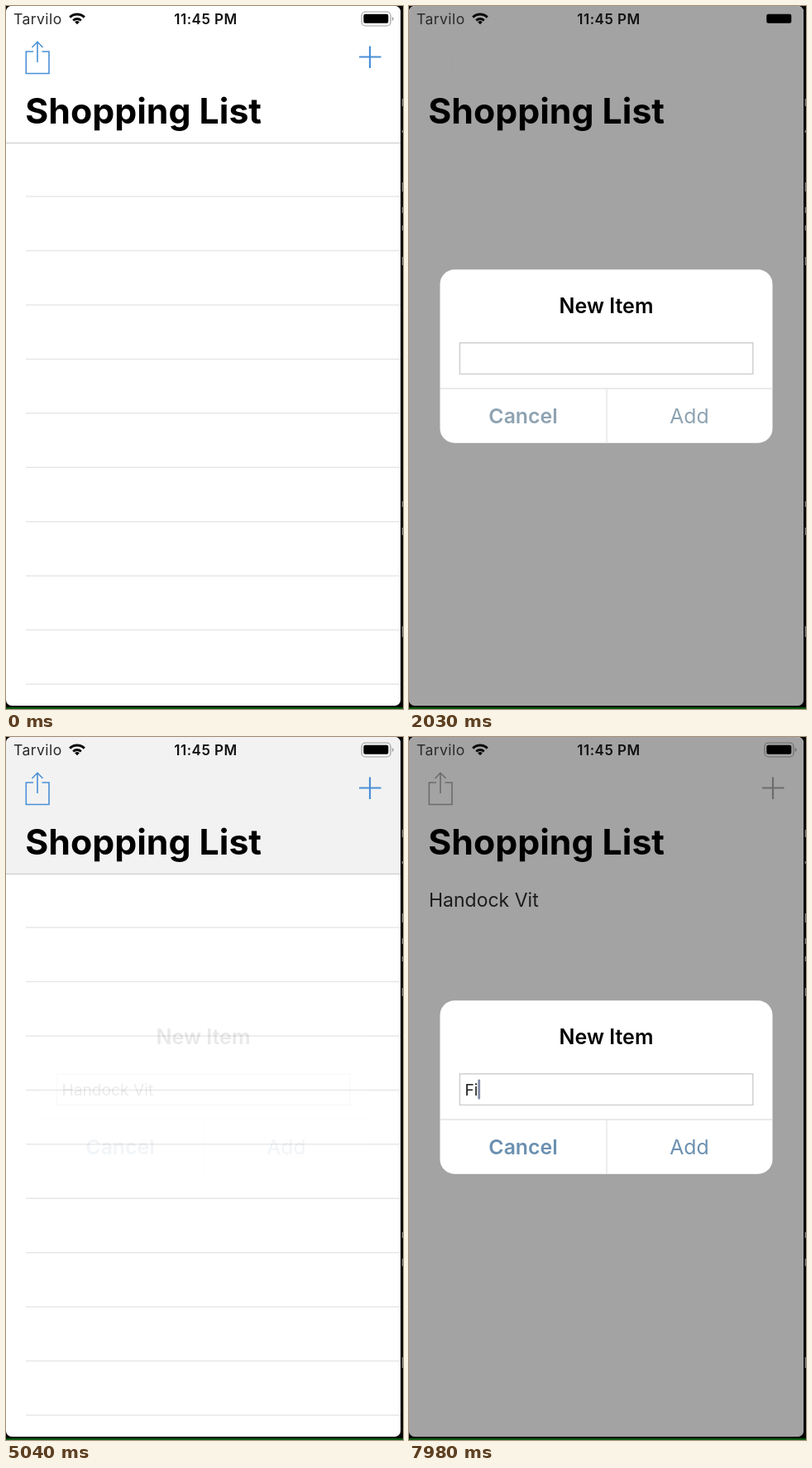
Recreate the animation shown at these times as an HTML page. Size 480x849 px, loop 8000 ms.

```html
<!DOCTYPE html>
<html lang="en">
<head>
<meta charset="utf-8">
<title>Shopping List</title>
<style>
html, body { margin: 0; width: 100%; height: 100%; overflow: hidden; background: #000; }
svg { display: block; width: 100%; height: 100%; }
text { font-family: Inter, Roboto, "Liberation Sans", sans-serif; white-space: pre; }
.mid { text-anchor: middle; }
.semi { font-weight: 600; }
.line { fill: none; stroke: currentColor; }
</style>
</head>
<body>
<svg viewBox="0 0 480 849">
  <defs><clipPath id="screen"><rect width="477" height="845" rx="7"/></clipPath></defs>
  <rect width="480" height="849" fill="#060606"/>
  <rect y="847" width="480" height="2" fill="#0b5a10"/>
  <g id="specks" fill="#777"></g>

  <g clip-path="url(#screen)">
    <rect width="478" height="845" fill="#fff"/>
    <rect id="header" width="478" height="165"/>
    <rect id="dim" width="478" height="845" fill="#000"/>
    <g id="rules">
      <path d="M0 165.5H478" stroke="#000" stroke-opacity=".17" stroke-width="1.5"/>
      <g id="rows" stroke="#000" stroke-opacity=".095" stroke-width="1.5"></g>
    </g>

    <text x="9" y="21.5" font-size="17.6" letter-spacing=".4" fill="#2a2a2a">Tarvilo</text>
    <g fill="none" stroke="#0a0a0a" stroke-width="3">
      <path d="M77.2 13.6a12.6 12.6 0 0 1 17.6 0"/>
      <path d="M81.2 17.4a7 7 0 0 1 9.6 0" stroke-width="2.8"/>
      <path d="M86 22.2l-2.8-2.8a4 4 0 0 1 5.6 0z" fill="#0a0a0a" stroke="none"/>
    </g>
    <text class="mid semi" x="241.5" y="21.5" font-size="17" letter-spacing=".5" fill="#111">11:45 PM</text>
    <g id="battery">
      <rect class="line" x="430" y="7" width="35" height="17" rx="4.5" stroke-width="1.2"/>
      <path d="M466.8 13v5a2.6 2.6 0 0 0 0-5z" fill="currentColor"/>
    </g>
    <rect x="432.3" y="9.8" width="30" height="11" rx="2" fill="#000"/>

    <g id="share" class="line" stroke-width="1.6">
      <path d="M33 55H24.3V81.5H52V55H43.5M38 68V44M31.5 50L38 43.3L44.5 50"/>
    </g>
    <path id="plus" class="line" d="M427 61.5H453.5M440 48.5V75" stroke-width="2.2"/>

    <text x="23.3" y="141.5" font-size="42.8" font-weight="700">Shopping List</text>
    <text id="item" x="24" y="205.3" font-size="23" fill="#1c1c1c"></text>

    <g id="alert">
      <rect x="37.5" y="318.3" width="402" height="209.4" rx="17.5" fill="#fff"/>
      <path d="M38 462H439.5M239 462V527.5" stroke="#e4e4e6" stroke-width="1.3"/>
      <rect x="61.4" y="406.8" width="354.4" height="37.6" fill="#fff" stroke="#d0d0d2" stroke-width="1.5"/>
      <text id="title" class="mid semi" x="238.5" y="371.4" font-size="25">New Item</text>
      <text id="entry" x="67.5" y="432.6" font-size="19.2" fill="#222"></text>
      <rect id="caret" y="413.5" width="2.8" height="24" rx="1" fill="#858aa6"/>
      <g id="buttons" fill="currentColor" font-size="24.8">
        <text class="mid semi" x="138" y="504.4">Cancel</text>
        <text class="mid" x="339" y="504.4">Add</text>
      </g>
    </g>
  </g>
</svg>
<script>
const LOOP = 8000, OPEN_MS = 250, DIM = 0.36;
const ITEM = 'Handock Vit';
const BLUE = [74, 144, 214], WASH = [163, 163, 163], GREY = [108, 108, 108];

// Each session: opening, settling of the tints, closing, typed text with key times
const sessions = [
  { open: 1060, settle: [2660, 3360], close: 4830, text: ITEM,
    keys: [2660, 2760, 2870, 2980, 3090, 3200, 3320, 3500, 3780, 3920, 3990] },
  { open: 6050, settle: [6930, 7630], close: 9000, text: 'Fi', keys: [7910, 7980] }
];
const presses = [[770, 980], [5810, 6020]];

const $ = id => document.getElementById(id);
const clamp = x => Math.max(0, Math.min(1, x));
const ramp = (t, a, b) => clamp((t - a) / (b - a));
const mix = (a, b, k) => a.map((v, i) => v + (b[i] - v) * k);
const rgb = c => `rgb(${c.map(Math.round)})`;

$('rows').innerHTML = Array.from({ length: 10 }, (_, i) =>
  `<path d="M24 ${(230 + i * 65.45).toFixed(1)}H478"/>`).join('');
$('specks').innerHTML = [[112, 9], [150, 3], [213, 11], [243, 7], [265, 6], [303, 10], [598, 7], [630, 9], [749, 13]]
  .map(([y, h]) => `<rect x="478.6" y="${y}" width="1.4" height="${h}"/>`).join('');
$('item').textContent = ITEM;

function drawAlert(s, t, p, shown) {
  const scale = 1.2 - 0.2 * p;
  $('alert').setAttribute('transform',
    `translate(238.7 423) scale(${scale}) translate(-238.7 -423)`);
  $('alert').setAttribute('opacity', Math.min(1, p * 1.22) * shown);
  $('title').setAttribute('fill-opacity', p < 1 ? p * 0.93 : 1);

  const typed = s.keys.filter(k => t >= k).length;
  const entry = $('entry');
  entry.textContent = s.text.slice(0, typed);
  const blinkOn = (t - s.open) % 1000 < 550;
  $('caret').setAttribute('x', 67.3 + (typed ? entry.getComputedTextLength() : 0));
  $('caret').setAttribute('opacity', t < s.close && (typed || blinkOn) ? 1 : 0);
}

function draw(t) {
  const s = t < 5500 ? sessions[0] : sessions[1];
  const p = 1 - (1 - ramp(t, s.open, s.open + OPEN_MS)) ** 1.65;
  const shown = 1 - ramp(t, s.close, s.close + 230);
  const lit = 1 - ramp(t, s.close, s.close + 210);
  const shade = p * lit;
  const settled = ramp(t, ...s.settle);

  $('dim').setAttribute('opacity', DIM * shade);
  $('rules').setAttribute('opacity', 1 - shade ** 3);
  const bar = t < s.close ? 255 : 242 + 13 * ramp(t, 5040, 5250);
  const top = mix([255, 255, 255], [bar, bar, bar], 1 - lit);
  $('header').setAttribute('fill', rgb(top));

  // Icons lose their tint into the shaded page, then settle as grey
  const faded = mix(BLUE, [128, 128, 136], clamp(p / 0.7));
  const tint = p < 1 ? mix(faded, WASH, ramp(p, 0.7, 1)) : mix(WASH, GREY, settled);
  const icon = rgb(mix(BLUE, tint, lit));
  $('share').style.color = $('plus').style.color = icon;
  const pressed = presses.some(([a, b]) => t >= a && t < b);
  $('plus').setAttribute('opacity', pressed ? 0.35 : 1);
  const edge = mix([160, 160, 160], [110, 110, 110], shade);
  $('battery').style.color = rgb(mix(edge, WASH, p === 1 ? lit * (1 - settled) : 0));

  const washed = mix([100, 155, 212], [142, 163, 178], ramp(p, 0.7, 1));
  $('buttons').style.color = rgb(mix(washed, [108, 144, 176], settled));

  $('item').setAttribute('opacity', ramp(t, 5330, 5600));
  drawAlert(s, t, p, shown);
}

const start = performance.now();
function tick() {
  draw((performance.now() - start) % LOOP);
  requestAnimationFrame(tick);
}
tick();
</script>
</body>
</html>
```
